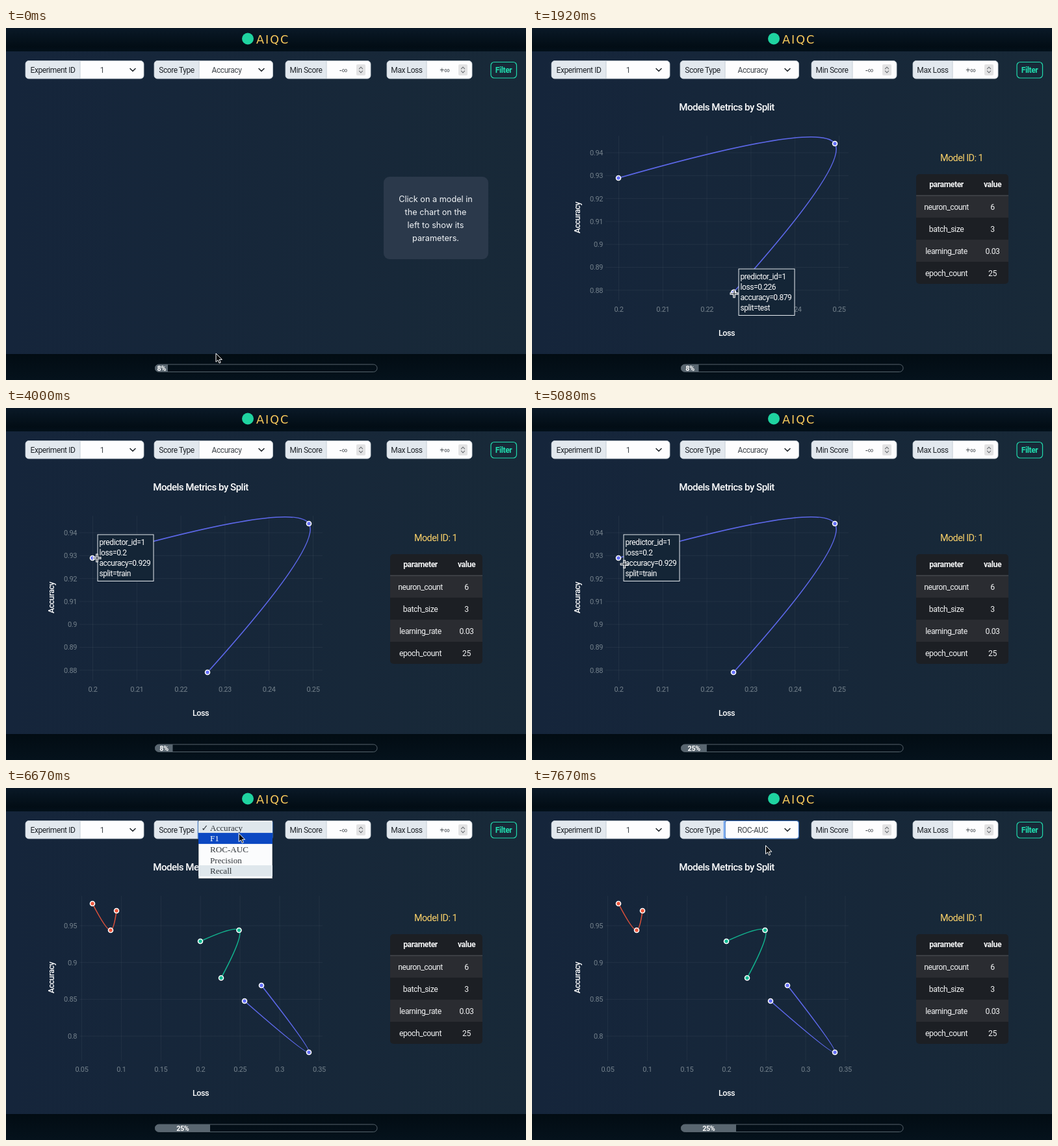
Animation of 800x542 px, one loop 8 s. Source, as an HTML page:

```html
<!DOCTYPE html>
<html lang="en">
<head>
<meta charset="utf-8">
<title>Model metrics dashboard</title>
<style>
  html, body { margin: 0; width: 100%; height: 100%; overflow: hidden; background: #16263a; }
  svg { display: block; width: 800px; height: 542px; }
  text { font-family: Roboto, "Liberation Sans", sans-serif; letter-spacing: -.035em; }
  .plain { font-family: Inter, "Open Sans", sans-serif; letter-spacing: 0; }
  .sign { font-family: "Liberation Sans", sans-serif; letter-spacing: 0; }
  .menu { font-family: "Liberation Serif", "Noto Serif", serif; letter-spacing: 0; }
  .brand { font-family: "DejaVu Sans", sans-serif; letter-spacing: 2px; }
  .bold { font-weight: 700; }
  .mid { font-weight: 500; }
</style>
</head>
<body>
<svg id="stage" viewBox="0 0 800 542" xmlns="http://www.w3.org/2000/svg"></svg>
<script>
const LOOP = 8000, FPS = 12;
const PURPLE = '#636efa', GREEN = '#12bd95', RED = '#ef553b';

// ---- drawing helpers ----
const text = (x, y, size, str, fill = '#fff', cls = '', anchor = 'middle', extra = '') =>
  `<text x="${x}" y="${y + size * 0.355}" font-size="${size}" fill="${fill}" class="${cls}" text-anchor="${anchor}" ${extra}>${str}</text>`;
const rect = (x, y, w, h, fill, extra = '') =>
  `<rect x="${x}" y="${y}" width="${w}" height="${h}" fill="${fill}" ${extra}/>`;
const path = (d, stroke, width = 1, extra = '') =>
  `<path d="${d}" fill="none" stroke="${stroke}" stroke-width="${width}" ${extra}/>`;
const group = (id, body) => `<g id="${id}">${body}</g>`;
const chevron = (x, y, r, dir, color, w) =>
  path(`M${x - r} ${y - dir * r / 2}l${r} ${dir * r}l${r} ${-dir * r}`, color, w, 'stroke-linecap="round" stroke-linejoin="round"');

function field(x, split, end, label) {
  const r = 5, top = 50.5, h = 27.5;
  return rect(x, top, end - x, h, '#fdfdfe', `rx="${r}"`) +
    `<path d="M${split} ${top}H${x + r}a${r} ${r} 0 0 0 ${-r} ${r}v${h - 2 * r}a${r} ${r} 0 0 0 ${r} ${r}H${split}z" fill="#e2e8ee"/>` +
    path(`M${split} ${top}v${h}`, '#c6ced6') +
    rect(x, top, end - x, h, 'none', `rx="${r}" stroke="#c6ced6" stroke-width=".8"`) +
    text((x + split) / 2, 65, 12, label, '#1d2228');
}
const spinner = x => rect(x - 7, 56, 14, 17, '#e3e3e4', 'rx="2"') +
  chevron(x, 61.5, 2.6, -1, '#6a6e73', 1.1) + chevron(x, 67.5, 2.6, 1, '#6a6e73', 1.1);

// Centripetal spline through three points
function spline([a, b, c]) {
  const d1 = [a[0] - b[0], a[1] - b[1]], d2 = [c[0] - b[0], c[1] - b[1]];
  const r1 = Math.sqrt(Math.hypot(...d1)), r2 = Math.sqrt(Math.hypot(...d2));
  const tangent = (sign, r) => b.map((v, i) =>
    v + sign * (r2 * r2 * d1[i] - r1 * r1 * d2[i]) / (3 * r * (r1 + r2)));
  return `M${a}Q${tangent(1, r2)} ${b}Q${tangent(-1, r1)} ${c}`;
}
const series = (pts, color) => path(spline(pts), color, 1.6, 'stroke-opacity=".92"') +
  pts.map(p => `<circle cx="${p[0]}" cy="${p[1]}" r="3.5" fill="${color}" stroke="#fff" stroke-width="1.6"/>`).join('');

function axes(xs, x0, dx, ys, y0, dy) {
  let grid = '', labels = '';
  xs.forEach((s, i) => {
    const x = x0 + i * dx;
    grid += `M${x} 166V420`;
    labels += text(x, 433, 11, s, '#75828c');
  });
  ys.forEach((s, i) => {
    const y = y0 + i * dy;
    grid += `M113 ${y}H487`;
    labels += text(109, y, 11, s, '#75828c', '', 'end');
  });
  return path(grid, '#fff', 1, 'stroke-opacity=".05"') + labels;
}

// ---- scene ----
const first = [[133, 231], [466, 178], [310, 407]];
const chartOne = axes(['0.2', '0.21', '0.22', '0.23', '0.24', '0.25'], 133.5, 67.8,
  ['0.94', '0.93', '0.92', '0.91', '0.9', '0.89', '0.88'], 192, 35.3) + series(first, PURPLE);
const chartTwo = axes(['0.05', '0.1', '0.15', '0.2', '0.25', '0.3', '0.35'], 116.5, 60.9,
  ['0.95', '0.9', '0.85', '0.8'], 212, 56.7) +
  series([[393, 304], [466, 407], [367, 328]], PURPLE) +
  series([[299, 236], [358.5, 219], [331, 292.5]], GREEN) +
  series([[133, 178], [161, 219], [170, 189]], RED);
const chartText = text(299.5, 121.5, 15.1, 'Models Metrics by Split', '#fff', 'mid') +
  text(299.5, 470, 12.6, 'Loss', '#fff', 'mid') +
  text(0, 0, 12.5, 'Accuracy', '#fff', 'mid', 'middle', 'transform="translate(69.5 292) rotate(-90)"');

const hint = rect(581, 229, 161, 127, '#2b394b', 'rx="9"') +
  ['Click on a model in', 'the chart on the', 'left to show its', 'parameters.']
    .map((s, i) => text(661, 263 + i * 20, 12.7, s, '#f1f4f7', 'plain')).join('');

const rows = [['parameter', 'value'], ['neuron_count', '6'], ['batch_size', '3'], ['learning_rate', '0.03'], ['epoch_count', '25']];
const table = text(661, 200, 14.3, 'Model ID: 1', '#fbd26a') +
  rect(591, 225, 142, 169, '#1c1f24', 'rx="5"') +
  rect(591, 258, 142, 34, '#2a2c31') + rect(591, 326, 142, 34, '#2a2c31') +
  path('M591 258H733', '#54575c') +
  rows.map(([a, b], i) => {
    const y = i ? 242 + i * 33.8 : 241, cls = i ? '' : 'bold';
    return text(637.5, y, 12.2, a, '#f3f4f5', cls) + text(708.5, y, 12.2, b, '#f3f4f5', cls);
  }).join('');

const options = ['Accuracy', 'F1', 'ROC-AUC', 'Precision', 'Recall'];
const rowY = i => 52.6 + i * 16.7;
const menu = rect(296, 50, 114, 89.5, '#fbfcfd', 'stroke="#1a2430" stroke-width=".6"') +
  rect(296, 52, 114, 17, '#dfe7ec') + rect(296, 119, 114, 17, '#dfe7ec') +
  rect(296, 0, 114, 17, '#0b48c2', 'id="pick"') +
  text(306, 61, 13, '✓', '#30353a', 'menu') +
  options.map((s, i) => text(314, rowY(i) + 8.3, 13.1, s, '#30353a', 'menu opt', 'start')).join('');

const tip = rect(0, 0, 86, 71.5, '#142536', 'stroke="#e6ebf0"') +
  [0, 1, 2, 3].map(i => text(2.5, 12 + i * 16, 12, '', '#fff', 'line', 'start')).join('');
const arrow = '<path d="M0 0V13.2L3.1 10.4L5.1 15L7.2 14.1L5.2 9.6H9.4Z" fill="#080b0e" stroke="#fff" stroke-width="1" stroke-linejoin="round"/>';
const cross = path('M-6.5 0H6.5M0 -6.5V6.5', '#fff', 3.6) + path('M-5.5 0H5.5M0 -5.5V5.5', '#1b2531', 1.2);

document.getElementById('stage').innerHTML =
  `<defs>
    <linearGradient id="page"><stop stop-color="#15253b"/><stop offset="1" stop-color="#182938"/></linearGradient>
    <linearGradient id="bar" x2="0" y2="1"><stop stop-color="#0a1927"/><stop offset=".8" stop-color="#020d15"/><stop offset="1" stop-color="#03101a"/></linearGradient>
    <linearGradient id="foot" x2="0" y2="1"><stop stop-color="#020c13"/><stop offset="1" stop-color="#05121c"/></linearGradient>
  </defs>` +
  rect(0, 0, 800, 542, 'url(#page)') + rect(0, 0, 800, 36, 'url(#bar)') + rect(0, 502, 800, 40, 'url(#foot)') +
  '<circle cx="372" cy="16.5" r="9" fill="#1fd3a0"/>' +
  text(385, 17.5, 17.6, 'AIQC', '#fbcb5c', 'brand', 'start') +
  field(30, 114, 212, 'Experiment ID') + text(148, 65, 12, '1', '#40464c') + chevron(195, 64.5, 4, 1, '#22272c', 1.6) +
  field(228, 297, 410.5, 'Score Type') +
  group('focus', rect(297, 50.5, 113.5, 27.5, 'none', 'rx="3" stroke="#3168b8" stroke-width="1.2"') + path('M295.8 50.5V78', '#78aaf0', 2.4)) +
  `<g id="score">${text(339.5, 65, 12, 'Accuracy', '#40464c')}</g>` + chevron(393, 64.5, 4, 1, '#22272c', 1.6) +
  field(430, 493, 561, 'Min Score') + text(519, 65, 12, '-∞', '#40464c', 'sign') + spinner(546) +
  field(586, 647, 717, 'Max Loss') + text(675, 65, 12, '+∞', '#40464c', 'sign') + spinner(703) +
  rect(746, 52.5, 39.5, 24.5, 'none', 'rx="5" stroke="#21dcae" stroke-width="1.2"') + text(765.5, 65, 12.1, 'Filter', '#21dcae', 'bold') +
  group('labels', chartText) + group('one', chartOne) + group('two', chartTwo) +
  group('hint', hint) + group('table', table) +
  '<clipPath id="pill"><rect x="229" y="518" width="342" height="11.5" rx="5.7"/></clipPath>' +
  rect(229, 518, 20, 11.5, '#596670', 'id="fill" clip-path="url(#pill)"') +
  rect(229.5, 518, 341.5, 11.5, 'none', 'rx="5.7" stroke="#57636c"') +
  text(0, 524, 10.8, '8%', '#fff', 'bold', 'middle', 'id="pct"') +
  group('tip', tip) + group('menu', menu) + group('arrow', arrow) + group('cross', cross);

// ---- timing ----
const $ = id => document.getElementById(id);
const set = (id, name, v) => $(id).setAttribute(name, v);
const show = (id, on) => { $(id).style.display = on ? '' : 'none'; };
const between = (t, a, b) => t >= a && t < b;
const smooth = k => k * k * (3 - 2 * k);
const clamp = k => Math.min(1, Math.max(0, k));

const moves = [
  [0, 323, 501], [584, 323, 501], [1333, 311, 409],
  [2167, 311, 409], [2833, 456, 175], [3000, 463, 178],
  [3084, 463, 178], [3917, 140, 231],
  [4834, 140, 231], [5667, 150, 275], [6083, 346, 113], [6416, 358, 67],
  [6500, 358, 67], [7250, 359.5, 88.5], [8000, 359.5, 88.5]
];
function pointer(t) {
  const i = Math.max(1, moves.findIndex(m => m[0] > t));
  const [t0, x0, y0] = moves[i - 1], [t1, x1, y1] = moves[i];
  const k = smooth(clamp((t - t0) / (t1 - t0)));
  return [x0 + (x1 - x0) * k, y0 + (y1 - y0) * k];
}

// from, until, left, point height, loss, accuracy, split
const tips = [
  [1240, 2240, 318, 407, '0.226', '0.879', 'test'],
  [2910, 3160, 371.5, 178, '0.249', '0.944', 'validation'],
  [3825, 5160, 141, 231, '0.2', '0.929', 'train']
];
const lines = document.querySelectorAll('.line'), opts = document.querySelectorAll('.opt');
const scoreText = $('score').firstChild;

function render(ms) {
  const t = Math.floor((ms + 5) * FPS / 1000) * 1000 / FPS;
  const [x, y] = pointer(t);

  const second = t >= 5160;
  show('labels', t >= 160);
  show('one', t >= 160 && !second);
  show('two', second);
  show('hint', t < 1910);
  show('table', t >= 1910);

  const w = 20 + 7.5 * smooth(clamp((t - 84) / 333)) + 57.5 * smooth(clamp((t - 4834) / 833));
  set('fill', 'width', w);
  set('pct', 'x', 229 + w / 2 + 0.3);
  $('pct').textContent = t < 4910 ? '8%' : '25%';

  const hover = tips.find(h => between(t, h[0], h[1]));
  show('tip', hover);
  if (hover) {
    const [, , left, py, loss, acc, split] = hover;
    set('tip', 'transform', `translate(${left} ${py - 36})`);
    ['predictor_id=1', 'loss=' + loss, 'accuracy=' + acc, 'split=' + split]
      .forEach((s, i) => { lines[i].textContent = s; });
  }

  const open = between(t, 6575, 7660);
  const picked = between(t, 7490, 7575) ? -1 : Math.floor((y - rowY(0)) / 16.7);
  show('menu', open);
  show('pick', picked >= 0);
  set('pick', 'y', rowY(picked) - 0.2);
  opts.forEach((o, i) => o.setAttribute('fill', i === picked ? '#fff' : '#30353a'));
  show('focus', t >= 6575);
  scoreText.textContent = t >= 7660 ? 'ROC-AUC' : 'Accuracy';

  const onPlot = between(x, 117, 488) && between(y, 165, 420);
  show('cross', onPlot);
  show('arrow', !onPlot);
  set(onPlot ? 'cross' : 'arrow', 'transform', `translate(${x} ${y})`);
}

const start = performance.now();
function tick() {
  render((performance.now() - start) % LOOP);
  requestAnimationFrame(tick);
}
tick();
</script>
</body>
</html>
```
